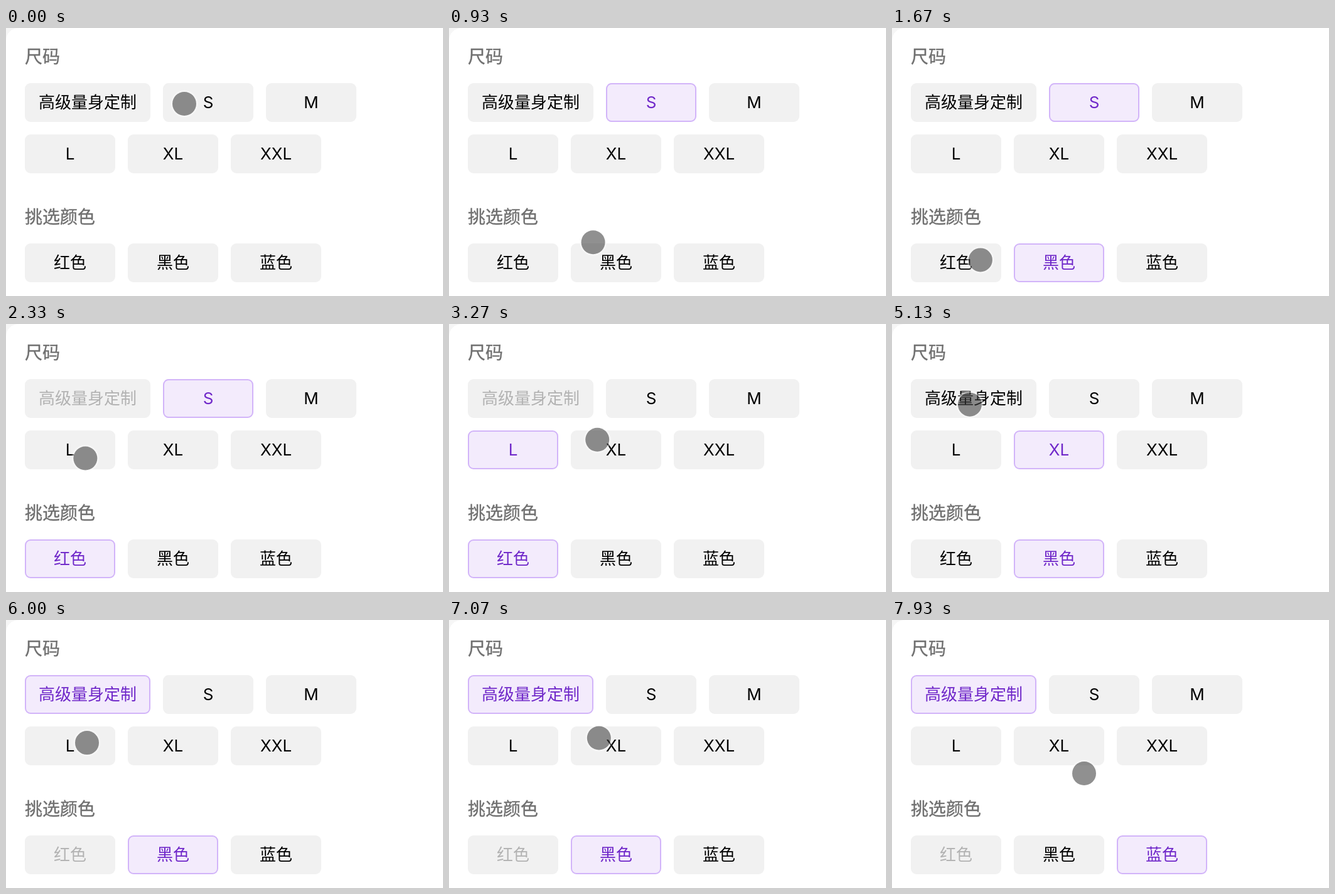
Recreate the animation shown at these times as an HTML page. Size 696 by 428 pixels, loop 8000 ms.

```html
<!DOCTYPE html>
<html lang="zh-CN">
<head>
<meta charset="utf-8">
<style>
html, body { margin: 0; width: 100%; height: 100%; overflow: hidden; background: #f6f6f6; }
#panel {
  position: absolute; inset: 0; overflow: hidden;
  background: #fff; border-top-left-radius: 20px;
}
svg { position: absolute; left: 0; top: 0; }
text { font: 26px Inter, "Noto Sans CJK SC", "Noto Sans CJK", sans-serif; fill: #000; text-anchor: middle; }
.title { font-size: 28px; fill: #707070; stroke: #707070; stroke-width: .4px; text-anchor: start; }
rect { fill: #f1f1f1; stroke: #f1f1f1; stroke-width: 2; }
.on rect { fill: #f3ebfc; stroke: #d2b4f9; }
.on text { fill: #6f27c9; }
.off text { fill: #b2b2b2; }
#touch {
  position: absolute; left: -19px; top: -19px; width: 38px; height: 38px;
  border-radius: 50%; background: rgba(60, 60, 60, .57);
  box-shadow: 0 0 3px 2px rgba(255, 255, 255, .6);
}
</style>
</head>
<body>
<div id="panel">
  <svg width="696" height="428"></svg>
  <div id="touch"></div>
</div>
<script>
const LOOP = 8000, STEP = 1000 / 15, PRESS = 45;
const CUSTOM = '高级量身定制', RED = '红色', BLACK = '黑色', BLUE = '蓝色';
const sizes = [CUSTOM, 'S', 'M', 'L', 'XL', 'XXL'];
const colors = [RED, BLACK, BLUE];

// Where the finger rests: button to press, x, y, arrival, departure
const stops = [
  ['S', 284, 121, 0, 400],
  [BLACK, 223, 369, 1070, 1440],
  [RED, 104, 371, 1800, 1990],
  ['L', 129, 196, 2420, 2800],
  ['XL', 262, 182, 3450, 3845],
  [BLACK, 234, 372, 4320, 4600],
  [CUSTOM, 120, 120, 5200, 5400],
  ['', 135, 120, 5500, 5780],
  [RED, 115, 374, 6386, 6450],
  ['', 169, 106, 6800, 6810],
  [BLUE, 411, 392, 7533, 7700],
  ['', 306, 245, 7933, LOOP]
];

const svg = document.querySelector('svg');
const touch = document.getElementById('touch');
const buttons = {};

function add(parent, tag, attrs) {
  const el = document.createElementNS('http://www.w3.org/2000/svg', tag);
  for (const key in attrs) el.setAttribute(key, attrs[key]);
  return parent.appendChild(el);
}

function addRow(y, labels) {
  let x = 30;
  for (const label of labels) {
    const w = Math.max(144, label.length * 26 + 44);
    const g = buttons[label] = add(svg, 'g', {});
    add(g, 'rect', { x: x + 1, y: y + 1, width: w - 2, height: 60, rx: 8 });
    add(g, 'text', { x: x + w / 2, y: y + 40 }).textContent = label;
    x += w + 20;
  }
}

function addTitle(y, title) {
  add(svg, 'text', { class: 'title', x: 30, y }).textContent = title;
}

addTitle(56, '尺码');
addRow(88, sizes.slice(0, 3));
addRow(170, sizes.slice(3));
addTitle(312, '挑选颜色');
addRow(344, colors);

// The custom size is not offered in red
const blocked = (label, chosen) =>
  label === CUSTOM && chosen.color === RED || label === RED && chosen.size === CUSTOM;

function chosenAt(t) {
  const chosen = { size: '', color: '' };
  for (const [label, , , , leave] of stops) {
    if (!label || leave - PRESS > t || blocked(label, chosen)) continue;
    chosen[colors.includes(label) ? 'color' : 'size'] = label;
  }
  return chosen;
}

function touchAt(t) {
  const i = stops.findIndex(stop => t < stop[4]);
  const [, x, y, arrive] = stops[i];
  if (t >= arrive) return [x, y];
  const [, x0, y0, , leave] = stops[i - 1];
  const u = (t - leave) / (arrive - leave), s = u * u * (3 - 2 * u);
  return [x0 + (x - x0) * s, y0 + (y - y0) * s];
}

function draw(now) {
  const t = Math.floor((now % LOOP + 4) / STEP) * STEP % LOOP;
  const chosen = chosenAt(t);
  for (const label in buttons) {
    const on = label === chosen.size || label === chosen.color;
    buttons[label].setAttribute('class', on ? 'on' : blocked(label, chosen) ? 'off' : '');
  }
  const [x, y] = touchAt(t);
  touch.style.transform = `translate(${x}px, ${y}px)`;
}

const start = performance.now();
function tick() {
  draw(performance.now() - start);
  requestAnimationFrame(tick);
}
tick();
</script>
</body>
</html>
```
